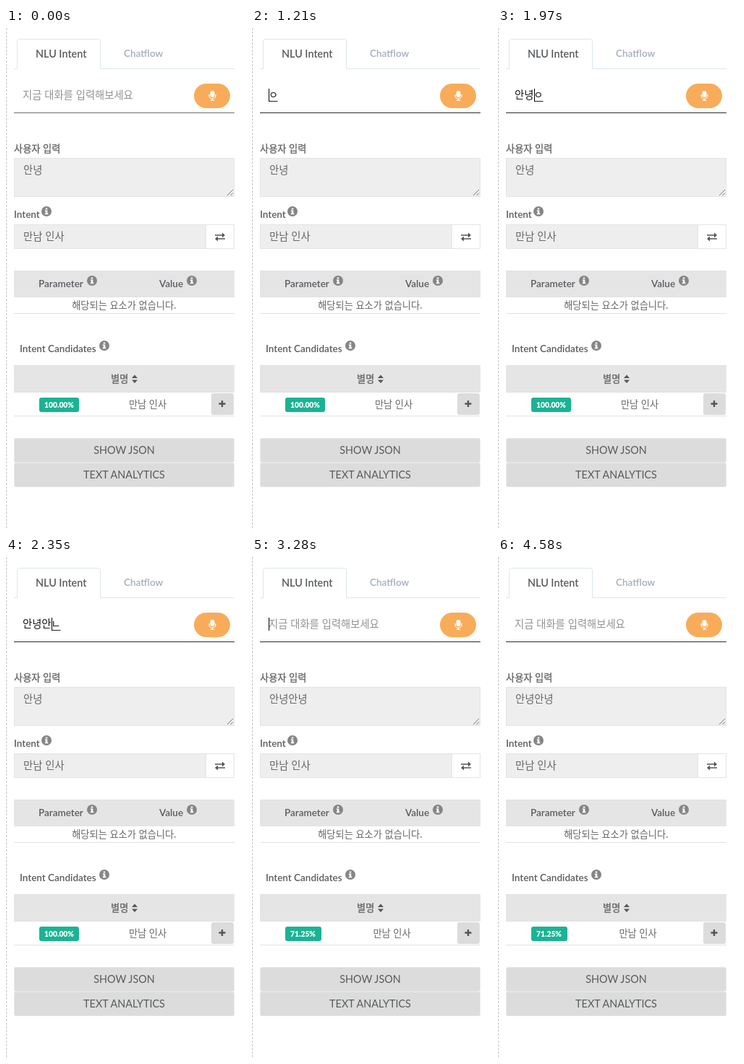
An HTML page for the animation above (4.67 s loop, 332 by 694 pixels).

```html
<!DOCTYPE html>
<html lang="ko">
<head>
<meta charset="utf-8">
<title>NLU Intent</title>
<style>
  html, body { margin: 0; width: 100%; height: 100%; overflow: hidden; background: #fff; }
  svg { display: block; }
  text { font: 14.4px Lato, sans-serif; fill: #585b5e; white-space: pre; }
  .sm { font-size: 13.5px; }
  .b { font-weight: 600; }
  .ko { font: 350 14.3px "Noto Sans CJK KR", "Noto Sans CJK", sans-serif; fill: #666; }
  .ko.sm { font-size: 13.2px; }
  .ko.semi { stroke: #666; stroke-width: .35; }
  .mid { text-anchor: middle; }
  .line { stroke: #e0e2e4; fill: none; }
  .field { fill: #eee; stroke: #e2e4e6; }
  .head { fill: #e6e5e6; }
  .btn { fill: #dcdcdc; stroke: #e4e6e8; }
  .icon { stroke: #555; stroke-width: 1.6; fill: none; }
</style>
</head>
<body>
<svg width="332" height="694" viewBox="0 0 332 694">
  <defs>
    <g id="info">
      <circle r="7" fill="#858585"/>
      <path d="M-1.3-4.6h2.6v2h-2.6zM-2.2-1.6h3.5v4.2h1v1.6h-4.5v-1.6h1v-2.6h-1z" fill="#fff"/>
    </g>
  </defs>
  <path d="M.5 0V694" stroke="#c2c2c2" stroke-dasharray="3 2"/>

  <!-- Tabs -->
  <path d="M11 56.5H15.5V18.5q0-3 3-3H127.5q3 0 3 3V56.5H316" fill="none" stroke="#dce7ec"/>
  <text x="41" y="41" class="b">NLU Intent</text>
  <text x="163" y="40" class="b sm" style="fill:#a4adbd">Chatflow</text>

  <!-- Prompt -->
  <text id="prompt" x="23" y="98" class="ko"></text>
  <path id="compose" stroke="#222"/>
  <path id="caret" stroke="#000"/>
  <path id="rule" d="M11 117.5H316"/>
  <rect x="260" y="77" width="50" height="34" rx="17" fill="#f8ac59"/>
  <rect x="282.5" y="87" width="6" height="9" rx="3" fill="#fff"/>
  <path d="M281 92v1.5a4.5 4.5 0 0 0 9 0V92M285.5 98v2.5M282.8 100.2h5.4" stroke="#fff" stroke-width="1.2" fill="none"/>

  <!-- Result -->
  <text x="11" y="171.5" class="ko sm semi">사용자 입력</text>
  <rect x="11.5" y="180.5" width="304" height="53" class="field"/>
  <text id="said" x="24" y="202" class="ko"></text>
  <path d="M306 232L314 224M310.5 232L314 228.5" stroke="#777"/>
  <text x="11" y="263" class="b sm">Intent</text>
  <use href="#info" x="56" y="254"/>
  <rect x="11.5" y="272.5" width="304" height="33" fill="#fff" stroke="#e2e4e6"/>
  <rect x="11.5" y="272.5" width="265" height="33" class="field"/>
  <text x="24" y="294" class="ko">만남 인사</text>
  <path d="M289 287H300M292 292H303" class="icon"/>
  <path d="M299 283.5L303 287L299 290.5zM293 288.5L289 292L293 295.5z" fill="#555"/>

  <!-- Parameters -->
  <rect x="11" y="336" width="305" height="37" class="head"/>
  <path d="M11 336.5H316M11 372.5H316M11 395.5H316" class="line"/>
  <text x="45" y="359" class="b sm">Parameter</text>
  <use href="#info" x="119" y="350"/>
  <text x="212" y="359" class="b sm">Value</text>
  <use href="#info" x="257" y="350"/>
  <text x="163.5" y="389" class="ko sm mid">해당되는 요소가 없습니다.</text>

  <!-- Candidates -->
  <text x="19" y="449" class="b sm">Intent Candidates</text>
  <use href="#info" x="136" y="440"/>
  <rect x="11" y="467" width="305" height="37" class="head"/>
  <path d="M11 467.5H316M11 504.5H316M11 537.5H316" class="line"/>
  <text x="145" y="491" class="ko sm semi">별명</text>
  <path d="M174 485L178 480.5L182 485zM174 487.5L178 492L182 487.5z" fill="#555"/>
  <rect id="badge" x="46" y="512" height="20" rx="3" fill="#1ab394"/>
  <text id="score" x="53" y="526" style="font-size:10.3px;font-weight:900;fill:#fff"></text>
  <text id="name" y="526" class="ko sm mid">만남 인사</text>
  <rect x="284" y="506" width="31" height="30" rx="3" fill="#dcdcdc"/>
  <path d="M294.5 520.5H303.5M299 516V525" class="icon" style="stroke-width:2.4"/>

  <rect x="11.5" y="568.5" width="304" height="33" rx="2" class="btn"/>
  <text x="163.5" y="590" class="mid">SHOW JSON</text>
  <rect x="11.5" y="602.5" width="304" height="33" rx="2" class="btn"/>
  <text x="163.5" y="624" class="mid">TEXT ANALYTICS</text>
</svg>
<script>
const LOOP = 4670, SENT = 3280, COMMIT = 2820, SYLLABLE = 13.25;
const HINT = '지금 대화를 입력해보세요';

// Each list holds [start time, value] pairs.
const typed = [
  [0, ''], [1210, 'ㅇ'], [1300, '아'], [1390, '안'],
  [1580, '안ㄴ'], [1670, '안녀'], [1770, '안녕'],
  [1970, '안녕ㅇ'], [2060, '안녕아'], [2160, '안녕안'],
  [2350, '안녕안ㄴ'], [2530, '안녕안녀'], [2630, '안녕안녕'], [SENT, '']
];
const blink = [[0, 0], [570, 1], [1030, 0], [1210, 1], [3740, 0], [4210, 1], [4580, 0]];
const ruleColor = [[0, '#707070'], [100, '#b4b4b4'], [190, '#e5e6e7'], [570, '#aaa'], [660, '#2a2a2a']];

const at = (list, t) => list.findLast(([start]) => start <= t)[1];
const el = id => document.getElementById(id);
const set = (id, attrs) => {
  for (const key in attrs) el(id).setAttribute(key, attrs[key]);
};

function draw(t) {
  const text = at(typed, t), sent = t >= SENT;
  const composing = text && t < COMMIT;
  const x = 23.5 + Math.round((text.length - (composing ? 1 : 0)) * SYLLABLE);

  el('prompt').textContent = text || HINT;
  el('prompt').style.fill = text ? '#111' : '#929292';
  set('caret', { d: `M${x} 84V102`, visibility: at(blink, t) ? 'visible' : 'hidden' });
  set('compose', { d: `M${x} 101.5h12`, visibility: composing ? 'visible' : 'hidden' });
  set('rule', { stroke: at(ruleColor, t) });

  el('said').textContent = sent ? '안녕안녕' : '안녕';
  el('score').textContent = sent ? '71.25%' : '100.00%';
  set('badge', { width: sent ? 50 : 55 });
  set('name', { x: sent ? 193.5 : 196 });
}

const begin = performance.now();
function tick() {
  draw((performance.now() - begin) % LOOP);
  requestAnimationFrame(tick);
}
tick();
</script>
</body>
</html>
```
